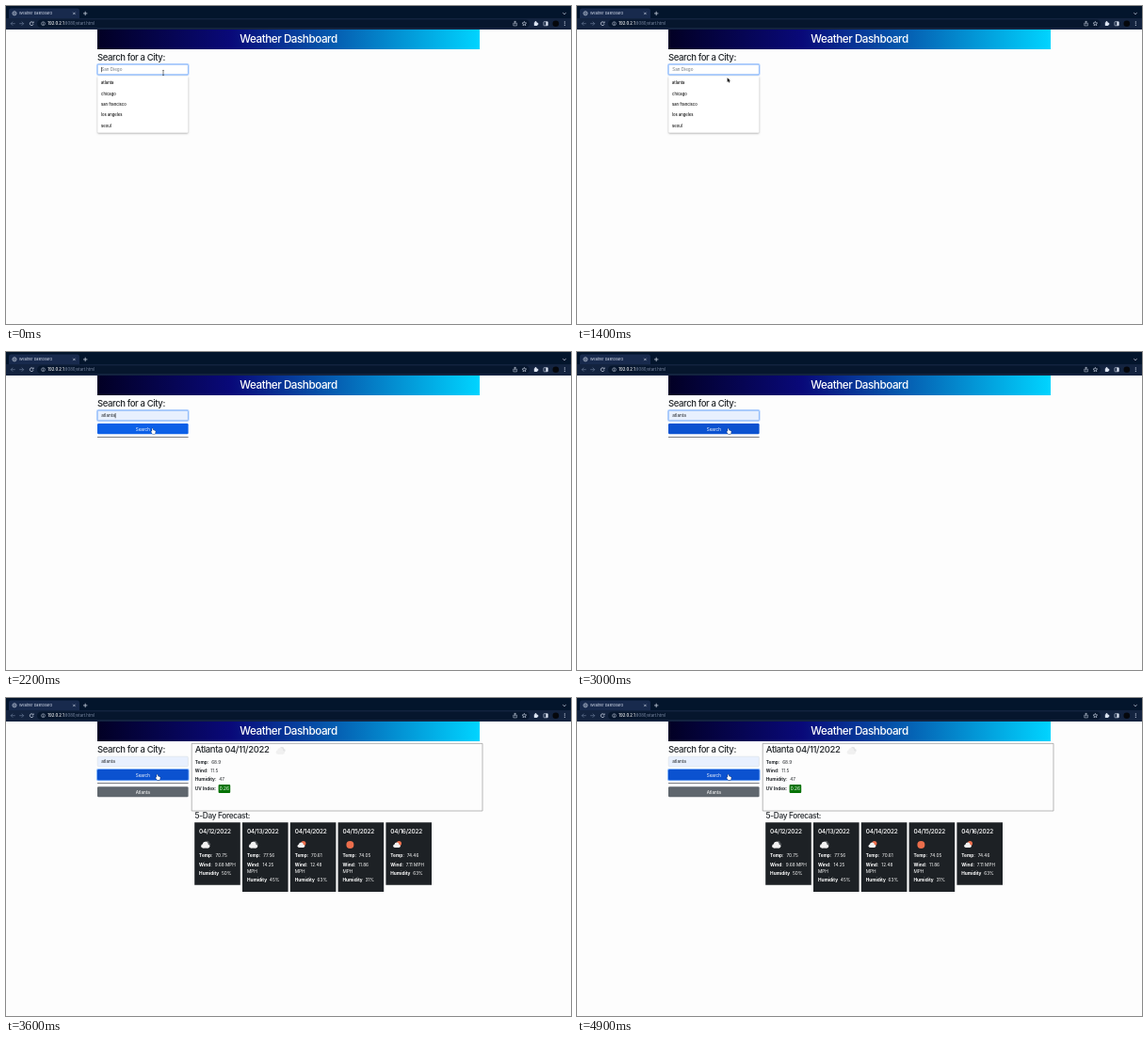
These frames come from a looping animation (600x338 px, 5 s). An HTML page with a canvas:

```html
<!DOCTYPE html>
<html lang="en">
<head>
<meta charset="utf-8">
<title>Weather Dashboard</title>
<style>
html, body { margin: 0; width: 100%; height: 100%; overflow: hidden; background: #fdfdfd; }
canvas { display: block; width: 600px; height: 338px; }
</style>
</head>
<body>
<canvas id="stage"></canvas>
<script>
const LOOP = 5000, STEP = 100, W = 600, H = 338;
const canvas = document.getElementById('stage');
const ctx = canvas.getContext('2d');
const dpr = window.devicePixelRatio || 1;
canvas.width = W * dpr;
canvas.height = H * dpr;

const cities = ['atlanta', 'chicago', 'san francisco', 'los angeles', 'seoul'];
const forecast = [
  { date: '04/12/2022', icon: 'cloud', temp: '70.75', wind: '9.68 MPH', humidity: '50%' },
  { date: '04/13/2022', icon: 'cloud', temp: '77.56', wind: '14.25', humidity: '45%' },
  { date: '04/14/2022', icon: 'partly', temp: '70.61', wind: '12.48', humidity: '63%' },
  { date: '04/15/2022', icon: 'sun', temp: '74.05', wind: '11.86', humidity: '31%' },
  { date: '04/16/2022', icon: 'partly', temp: '74.46', wind: '7.11 MPH', humidity: '63%' }
];
// time, x, y of the pointer
const pointerPath = [
  [0, 167, 71], [1000, 167, 71], [1400, 159.6, 76.2], [1800, 157, 80.5],
  [2200, 155.7, 81.2], [2500, 156, 81.2], [3000, 160.7, 81.4], [LOOP, 160.7, 81.4]
];

function rect(x, y, w, h, fill, r = 0) {
  ctx.fillStyle = fill;
  ctx.beginPath();
  ctx.roundRect(x, y, w, h, r);
  ctx.fill();
}

function frame(x, y, w, h, color, width, r = 0) {
  ctx.strokeStyle = color;
  ctx.lineWidth = width;
  ctx.beginPath();
  ctx.roundRect(x, y, w, h, r);
  ctx.stroke();
}

function line(points, color, width = 0.6) {
  ctx.strokeStyle = color;
  ctx.lineWidth = width;
  ctx.beginPath();
  points.forEach(([x, y], i) => i ? ctx.lineTo(x, y) : ctx.moveTo(x, y));
  ctx.stroke();
}

function disc(x, y, r, fill) {
  ctx.fillStyle = fill;
  ctx.beginPath();
  ctx.arc(x, y, r, 0, Math.PI * 2);
  ctx.fill();
}

function ring(x, y, r, color, width = 0.6) {
  ctx.strokeStyle = color;
  ctx.lineWidth = width;
  ctx.beginPath();
  ctx.arc(x, y, r, 0, Math.PI * 2);
  ctx.stroke();
}

// Draws text on its baseline and returns the width.
function text(str, x, y, size, { color = '#212529', weight = 400, align = 'left', track = 0 } = {}) {
  ctx.font = `${weight} ${size}px Inter, "Open Sans", sans-serif`;
  ctx.letterSpacing = `${track * size}px`;
  ctx.textAlign = align;
  ctx.fillStyle = color;
  ctx.fillText(str, x, y);
  return ctx.measureText(str).width;
}

const heading = (str, x, y, size, opts) => text(str, x, y, size, { weight: 500, track: -0.04, ...opts });

function field(label, value, x, y, color) {
  const w = text(label, x, y, 4.75, { weight: 700, color });
  text(value, x + w + 2.8, y, 4.75, { color });
}

function browser() {
  const ink = '#dbe3f2', dim = '#7585a3';
  rect(0, 0, W, 25, '#03152c');
  rect(3, 2.5, 75, 14, '#182a4d', 2.5);
  rect(0, 13, W, 12, '#13233f');
  rect(33, 14.4, 523, 8.6, '#06162d', 4.3);

  ring(9, 7.8, 2.1, ink);
  line([[7, 7.8], [11, 7.8]], ink, 0.4);
  line([[9, 5.8], [9, 9.8]], ink, 0.4);
  text('Weather Dashboard', 14, 9.2, 3.7, { color: ink });
  line([[71.2, 6.7], [73.6, 9.1]], ink);
  line([[73.6, 6.7], [71.2, 9.1]], ink);
  line([[82, 7.9], [86.4, 7.9]], ink, 0.7);
  line([[84.2, 5.7], [84.2, 10.1]], ink, 0.7);
  line([[591.3, 7.2], [593, 8.8], [594.7, 7.2]], ink, 0.7);

  line([[9.7, 18.7], [5.2, 18.7]], dim);
  line([[7.2, 16.7], [5.2, 18.7], [7.2, 20.7]], dim);
  line([[14.2, 18.7], [18.7, 18.7]], dim);
  line([[16.7, 16.7], [18.7, 18.7], [16.7, 20.7]], dim);
  ctx.strokeStyle = ink;
  ctx.lineWidth = 0.7;
  ctx.beginPath();
  ctx.arc(27.2, 18.7, 1.9, 0.3, 5.5);
  ctx.stroke();
  line([[29.2, 16.4], [29.2, 18], [27.6, 18]], ink);

  ring(39.5, 18.7, 1.9, ink, 0.5);
  line([[39.5, 18.3], [39.5, 19.9]], ink, 0.5);
  line([[39.5, 17.3], [39.5, 17.8]], ink, 0.5);
  const host = text('192.0.2.1', 44.2, 20.3, 4.25, { color: '#fff', weight: 500 });
  text(':8080/start.html', 44.2 + host, 20.3, 4.25, { color: '#7d8ba5' });

  frame(538.8, 18, 3.6, 2.9, ink, 0.5);
  line([[540.6, 19.5], [540.6, 16]], ink, 0.5);
  line([[539.5, 17], [540.6, 15.9], [541.7, 17]], ink, 0.5);
  ctx.strokeStyle = ink;
  ctx.lineWidth = 0.6;
  ctx.beginPath();
  for (let i = 0; i < 10; i++) {
    const a = -Math.PI / 2 + i * Math.PI / 5, r = i % 2 ? 1.1 : 2.4;
    ctx.lineTo(550.4 + r * Math.cos(a), 18.8 + r * Math.sin(a));
  }
  ctx.closePath();
  ctx.stroke();
  rect(560.8, 17.2, 3.6, 3.8, ink, 0.5);
  disc(562.5, 17, 0.9, ink);
  disc(564.5, 19, 0.9, ink);
  frame(571, 16.7, 4.3, 4.1, ink, 0.6, 0.4);
  rect(573.3, 16.7, 2, 4.1, ink);
  disc(583.8, 18.7, 3.3, '#05070c');
  for (let i = -1; i <= 1; i++) disc(593.3, 18.7 + i * 1.8, 0.55, ink);
}

function banner() {
  const g = ctx.createLinearGradient(97, 0, 503, 0);
  g.addColorStop(0, '#020024');
  g.addColorStop(0.35, '#090979');
  g.addColorStop(1, '#00d4ff');
  rect(97, 25, 406, 21, g);
  heading('Weather Dashboard', 300, 38.5, 11.7, { color: '#fff', align: 'center' });
}

function searchInput(t) {
  const filled = t >= 2000, preview = t >= 1500, focused = t < 3300;
  if (focused) rect(96, 61, 98.6, 13, 'rgba(13,110,253,.28)', 2);
  rect(97.2, 62.2, 96.2, 10.6, filled ? '#e8f0fe' : '#fff', 1.2);
  frame(97.2, 62.2, 96.2, 10.6, focused ? '#72a9f8' : '#ced4da', focused ? 0.7 : 0.4, 1.2);
  const w = preview
    ? text('atlanta', 101.2, 69.2, 4.6)
    : text('San Diego', 101.2, 69.2, 4.6, { color: '#6c757d' });
  const caret = t < 200 || (t >= 700 && t < 1200) || (t >= 2000 && t < 2500);
  if (caret) rect(101.2 + (filled ? w : 0), 64.9, 0.6, 5.4, '#111');
}

function searchButton(t) {
  const k = Math.min(1, Math.max(0, (t - 2100) / 200));
  const mix = (a, b) => Math.round(a + (b - a) * k);
  const fill = `rgb(${mix(13, 11)},${mix(110, 82)},${mix(253, 208)})`;
  if (t >= 3300) {
    rect(96, 75, 98.6, 13.2, '#86b6fc', 2);
  }
  rect(97, 76, 96.6, 11.2, fill, 1.2);
  text('Search', 145.3, 83.6, 4.6, { color: '#fff', align: 'center' });
  rect(97, 90.1, 96.6, 0.9, '#7b7d82');
}

function dropdown(t) {
  ctx.save();
  ctx.shadowColor = 'rgba(0,0,0,.35)';
  ctx.shadowBlur = 2 * dpr;
  ctx.shadowOffsetY = 0.6 * dpr;
  rect(97.2, 74.8, 96.2, 60, '#fff', 1);
  ctx.restore();
  if (t >= 1500) rect(97.2, 76.4, 96.2, 11.2, '#ebebeb');
  cities.forEach((city, i) => text(city, 101, 83.4 + i * 11.28, 4.15, { color: '#111', weight: 500 }));
}

function cloud(x, y, s, front, back) {
  const puff = (dx, dy, k, color) => {
    disc(x + dx - 1.9 * k, y + dy + 0.6 * k, 1.6 * k, color);
    disc(x + dx, y + dy - 0.7 * k, 2.2 * k, color);
    disc(x + dx + 2 * k, y + dy + 0.7 * k, 1.5 * k, color);
    rect(x + dx - 1.9 * k, y + dy, 3.9 * k, 2.2 * k, color);
  };
  if (back) puff(1.5 * s, -1.1 * s, 0.9 * s, back);
  puff(0, 0.6 * s, 1.15 * s, front);
}

function weatherIcon(kind, x, y) {
  const orange = '#ec6e4c';
  if (kind === 'sun') return disc(x + 1.2, y, 4, orange);
  if (kind === 'cloud') return cloud(x, y, 1.15, '#f2f2f2', '#55595c');
  disc(x + 2.4, y - 1.4, 2.6, orange);
  cloud(x, y, 0.95, '#f2f2f2');
}

function today() {
  frame(197.2, 48.4, 308.8, 71.6, '#999', 0.7);
  heading('Atlanta 04/11/2022', 200.8, 57.9, 9.5);
  cloud(291.3, 56.2, 1.15, '#f0f0f0', '#e3e3e4');
  field('Temp:', '68.9', 200.8, 69.6);
  field('Wind:', '11.5', 200.8, 79);
  field('Humidity:', '47', 200.8, 88.4);
  text('UV Index:', 200.8, 97.9, 4.75, { weight: 700 });
  rect(225.6, 92, 12.6, 9, '#067306', 1);
  text('0.26', 231.9, 98.2, 4.75, { color: '#fff', align: 'center' });
}

function cards() {
  heading('5-Day Forecast:', 200.6, 128.3, 8.3);
  forecast.forEach((day, i) => {
    const x = 200.2 + i * 50.8, left = x + 4.9;
    const wraps = !day.wind.includes('MPH');
    rect(x, 132.3, 48.6, wraps ? 73.8 : 66.5, '#1d2125');
    heading(day.date, left, 143.9, 6.5, { color: '#fff' });
    weatherIcon(day.icon, x + 11.6, 156);
    field('Temp:', day.temp, left, 169, '#fff');
    field('Wind:', day.wind, left, 178.5, '#fff');
    if (wraps) text('MPH', left, 185.8, 4.75, { color: '#fff' });
    field('Humidity', day.humidity, left, wraps ? 194.9 : 187.6, '#fff');
  });
}

function pointerAt(t) {
  const i = pointerPath.findIndex(p => p[0] > t);
  const [t0, x0, y0] = pointerPath[i - 1], [t1, x1, y1] = pointerPath[i];
  const k = (t - t0) / (t1 - t0);
  return [x0 + (x1 - x0) * k, y0 + (y1 - y0) * k];
}

function pointer(t) {
  const [x, y] = pointerAt(t);
  ctx.save();
  ctx.translate(x, y);
  ctx.lineJoin = 'round';
  if (t < 1100) {
    line([[0, -2.3], [0, 2.3]], '#222', 0.6);
    for (const s of [-1, 1]) line([[-1, 2.8 * s], [0, 2.3 * s], [1, 2.8 * s]], '#222', 0.5);
  } else {
    const hand = t >= 2000;
    const shape = new Path2D(hand
      ? 'M-.6 .4Q0-.5.5.4L.6 2Q1.2 1.5 1.5 2.2Q2.3 1.8 2.5 2.6Q3.2 2.4 3.1 3.3L2.6 5.7H-.2L-1.7 3.5Q-1.8 2.6-.6 3.2Z'
      : 'M0 0V4.7L1.1 3.7L1.9 5.4L2.7 5.1L1.9 3.4H3.4Z');
    ctx.lineWidth = hand ? 0.5 : 0.7;
    ctx.strokeStyle = hand ? '#111' : '#fff';
    ctx.fillStyle = hand ? '#fff' : '#111';
    ctx.stroke(shape);
    ctx.fill(shape);
  }
  ctx.restore();
}

function draw(t) {
  ctx.setTransform(dpr, 0, 0, dpr, 0, 0);
  rect(0, 0, W, H, '#fdfdfd');
  browser();
  banner();
  heading('Search for a City:', 97, 57.5, 9.5);
  searchInput(t);
  if (t < 2000) dropdown(t);
  else searchButton(t);
  if (t >= 3300) {
    rect(97, 94.2, 96.6, 11, '#5f666d', 1.2);
    text('Atlanta', 145.3, 101.6, 4.6, { color: '#fff', align: 'center' });
  }
  if (t >= 3600) {
    today();
    cards();
  }
  pointer(t);
}

let start;
function tick(now) {
  start ??= now;
  const t = (now - start) % LOOP;
  draw(Math.floor(t / STEP) * STEP);
  requestAnimationFrame(tick);
}
draw(0);
requestAnimationFrame(tick);
</script>
</body>
</html>
```
